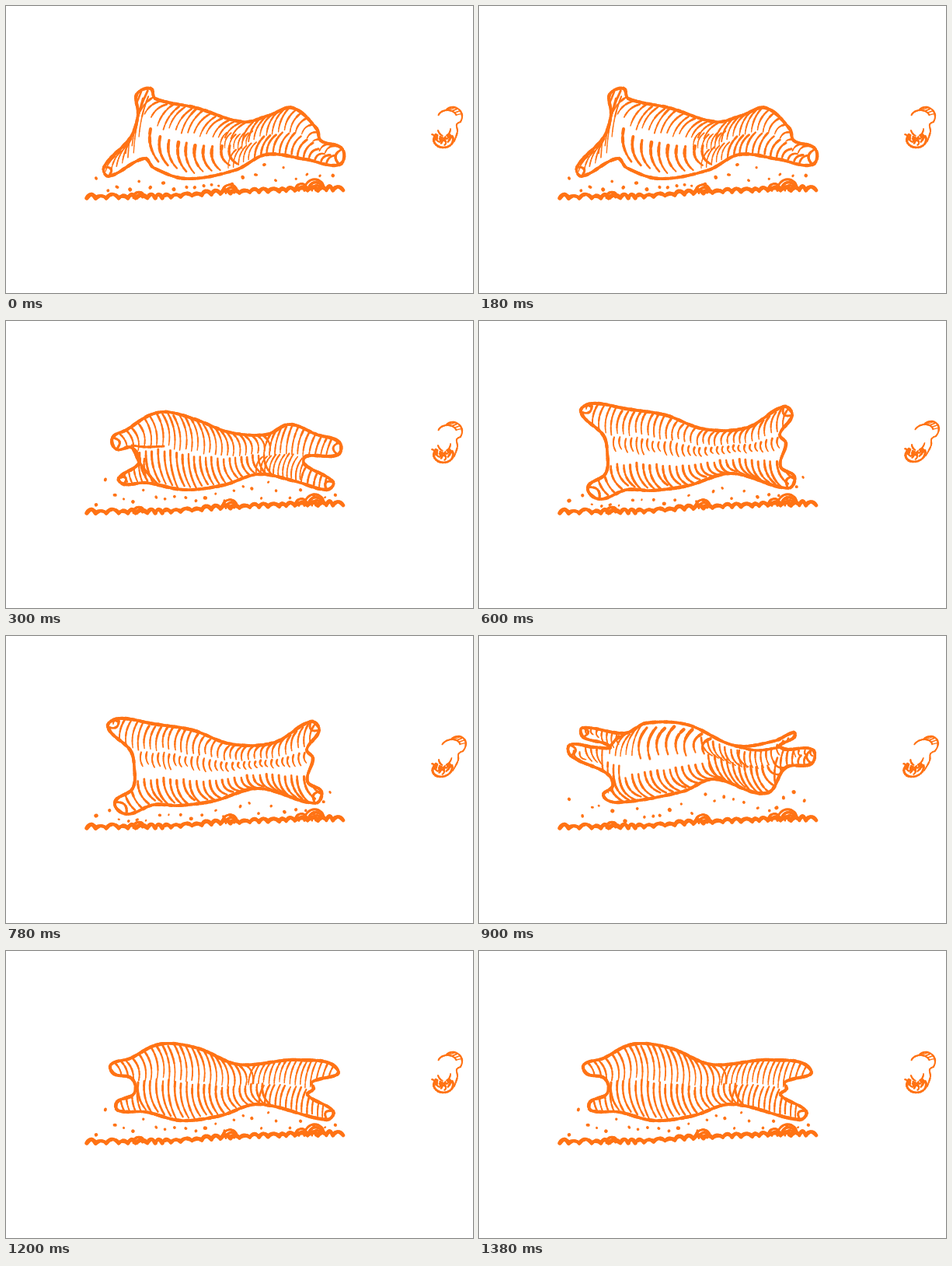
Recreate the animation shown at these times as an HTML page with a canvas. Size 601 by 369 pixels, loop 1500 ms.

```html
<!DOCTYPE html>
<html lang="en">
<head>
<meta charset="utf-8">
<title>Running hide</title>
<style>
html, body { margin: 0; width: 100%; height: 100%; overflow: hidden; background: #fff; }
canvas { display: block; width: 601px; height: 369px; }
</style>
</head>
<body>
<canvas id="stage" width="601" height="369"></canvas>
<script>
const INK = '#ff7315';
const STEP = 300;
const g = document.getElementById('stage').getContext('2d');

// body: key points, clockwise; feet: edges that end in a cut limb
// bands: from x, to x, start depth, end depth (0 top, 1 bottom), slant, bend, weight
const poses = [
  {
    body: '168,114 186,106 192,119 245,131 305,149 340,140 369,131 400,158 405,173 433,184 429,204 385,197 335,191 295,211 232,222 190,208 178,196 132,219 126,207 161,168 170,138',
    feet: [9, 17], seed: 3, lean: 0, shift: 0,
    bands: [
      [134, 184, .1, .7, -12, 2, 2.4], [174, 312, 0, .4, -20, 3, 2.8], [186, 300, .5, .93, 10, 5, 4],
      [284, 322, .25, .6, -8, 3, 2], [296, 326, .55, .95, -10, 3, 2.2],
      [318, 425, 0, .5, -14, 3, 2.7], [332, 432, .5, 1, -12, 3, 2.7]
    ]
  },
  {
    body: '137,150 155,140 185,121 208,117 245,127 287,143 335,146 365,133 400,146 429,156 427,172 386,174 384,184 421,207 413,217 372,206 325,197 280,211 230,217 180,208 152,210 145,202 171,182 162,163 142,165',
    feet: [9, 13, 20, 24], seed: 8, lean: 0, shift: 0,
    folds: ['162,160 180,162 203,161', '163,164 173,184 196,211'],
    bands: [
      [147, 335, 0, .48, 8, -4, 2.7], [172, 335, .5, 1, 10, 3, 2.7], [340, 425, 0, .55, -8, 2, 2.6],
      [330, 388, .52, 1, -8, 3, 2], [388, 424, .6, 1, -8, 2, 2.6], [152, 182, .6, 1, 4, 2, 2.4]
    ]
  },
  {
    body: '131,117 145,106 190,113 240,121 290,139 345,137 392,110 403,121 387,146 395,157 388,187 406,200 398,215 325,196 268,212 222,218 190,217 155,229 140,214 163,196 165,168 160,147',
    feet: [0, 6, 11, 17], seed: 5, lean: .2, shift: -1,
    bands: [
      [144, 398, 0, .33, -6, 3, 2.8], [174, 392, .34, .55, 2, 2, 2.6], [152, 398, .66, 1, 14, 4, 2.9]
    ]
  },
  {
    body: '117,140 148,143 168,142 134,130 133,118 188,125 215,112 268,114 330,141 380,135 405,124 406,130 388,143 429,146 428,164 395,169 370,202 302,184 262,200 178,214 160,205 172,193 165,177 118,154',
    feet: [3, 13, 23], seed: 6, lean: .23, shift: -3,
    folds: ['168,142 177,133 188,126', '330,142 358,147 388,143'],
    bands: [
      [138, 184, 0, .22, 2, 2, 2.4], [122, 184, .45, .9, 8, 3, 2.5], [180, 214, 0, .35, -12, 3, 2.5],
      [216, 302, .05, .48, -8, 6, 4], [165, 302, .62, 1, 20, 5, 2.9], [286, 338, .1, .5, 14, 4, 2.7],
      [295, 382, .42, 1, 16, 4, 2.7], [335, 428, .1, .5, 3, 2, 2.6], [384, 428, .4, 1, -3, 2, 2.6]
    ]
  },
  {
    body: '135,146 160,138 190,122 215,119 250,126 300,146 375,140 427,153 393,169 396,177 388,185 421,206 413,217 325,197 275,212 225,218 180,207 144,205 143,194 165,183 162,164 139,158',
    feet: [11], seed: 8, lean: 0, shift: 0,
    bands: [
      [140, 315, 0, .5, 8, -4, 2.7], [170, 335, .48, 1, 10, 4, 2.7], [320, 422, 0, .5, -8, 2, 2.4],
      [332, 418, .5, 1, -6, 2, 2.4], [148, 176, .58, 1, 4, 2, 2.4]
    ]
  }
];

const parse = s => s.split(' ').map(p => p.split(',').map(Number));
const mix = (a, b, t) => a + (b - a) * t;
const noise = n => { const v = Math.sin(n * 12.9898) * 43758.5453; return v - Math.floor(v); };

function random(seed) {
  let n = seed * 101;
  return (low = 0, high = 1) => mix(low, high, noise(++n));
}

// Smooth curve whose tangents scale with each segment, so corners stay tight
function smooth(pts, closed) {
  const n = pts.length, out = [];
  const at = i => closed ? pts[(i + n) % n] : pts[Math.max(0, Math.min(n - 1, i))];
  const aim = (p, q, len) => {
    const k = len / (Math.hypot(q[0] - p[0], q[1] - p[1]) || 1);
    return [(q[0] - p[0]) * k, (q[1] - p[1]) * k];
  };
  for (let i = 0; i < (closed ? n : n - 1); i++) {
    const [a, b, c, d] = [at(i - 1), at(i), at(i + 1), at(i + 2)];
    const len = Math.hypot(c[0] - b[0], c[1] - b[1]), steps = Math.ceil(len / 3);
    const u = aim(a, c, len), v = aim(b, d, len);
    for (let k = 0; k < steps; k++) {
      const t = k / steps, s = 1 - t;
      out.push([0, 1].map(j => s * s * (1 + 2 * t) * b[j] + t * t * (3 - 2 * t) * c[j] + s * t * (s * u[j] - t * v[j])));
    }
  }
  out.push(at(closed ? 0 : n - 1));
  return out;
}

function bow(a, b, bend) {
  const dx = b[0] - a[0], dy = b[1] - a[1], len = Math.hypot(dx, dy) || 1, steps = 8;
  return Array.from({ length: steps + 1 }, (_, i) => {
    const t = i / steps, h = 4 * t * (1 - t) * bend;
    return [a[0] + dx * t - dy / len * h, a[1] + dy * t + dx / len * h];
  });
}

function arc(x, y, rx, ry, from, to) {
  return Array.from({ length: 17 }, (_, i) => {
    const a = mix(from, to, i / 16) * Math.PI;
    return [x + rx * Math.cos(a), y + ry * Math.sin(a)];
  });
}

// Uneven pen line that thins towards its end
function ink(pts, width, taper = 0) {
  for (let i = 1; i < pts.length; i++) {
    const rough = 0.82 + 0.4 * noise(pts[i][0] + pts[i][1] * 3);
    g.lineWidth = width * rough * (1 - taper * i / pts.length);
    g.beginPath();
    g.moveTo(...pts[i - 1]);
    g.lineTo(...pts[i]);
    g.stroke();
  }
}

// Top and bottom of the outline at x
function span(outline, x) {
  const ys = [];
  for (let i = 1; i < outline.length; i++) {
    const [a, b] = [outline[i - 1], outline[i]];
    if ((a[0] <= x) !== (b[0] <= x)) ys.push(mix(a[1], b[1], (x - a[0]) / (b[0] - a[0])));
  }
  return ys.length ? [Math.min(...ys), Math.max(...ys)] : null;
}

function hatch(outline, [x0, x1, top, bottom, slant, bend, weight], seed) {
  const r = random(seed);
  for (let x = x0; x < x1; x += weight * r(2.5, 3.1)) {
    const start = span(outline, x), end = span(outline, x + slant) || start;
    if (!start) continue;
    const a = [x, mix(...start, top + r(0, 0.04))];
    const b = [x + slant, mix(...end, bottom - r(0, 0.06))];
    ink(bow(a, b, bend), weight, bottom < 1 ? 0.45 : 0.15);
  }
}

function groundY(x) {
  const t = Math.max(0, Math.min(1, (x - 200) / 230));
  return 247 - 10 * t * (2 - t);
}

function drawGround() {
  const r = random(2);
  for (let x = 104; x < 430;) {
    const next = Math.min(434, x + r(8, 17));
    ink(bow([x, groundY(x)], [next, groundY(next)], -r(2, 5)), 4.6);
    x = next;
  }
  for (const [x, size] of [[171, 7], [288, 10], [380, 8], [397, 13]]) {
    const y = groundY(x);
    for (let k = size; k > 2; k -= 3.5) ink(arc(x + (size - k) * 0.4, y, k, k * 1.1, -1, -0.1), 3);
  }
}

function drawDust(outline, seed) {
  const r = random(seed);
  for (let x = 116; x < 424; x += r(8, 18)) {
    const under = span(outline, x);
    const y = r(Math.max(200, under ? under[1] + 9 : 0), groundY(x) - 9);
    const size = r(1.5, 2.7);
    g.beginPath();
    g.ellipse(x, y, size, size * r(0.7, 1.1), r(0, 3), 0, Math.PI * 2);
    g.fill();
  }
}

function drawPaw(lean, shift) {
  const r = random(4);
  g.save();
  g.transform(1, 0, -lean, 1, lean * 170 + shift, -Math.sign(lean));
  ink(arc(568, 143, 12, 9, -0.9, -0.1), 2);
  ink(arc(575, 142, 12, 12, -0.75, 0.2), 2.2);
  for (let a = -0.7; a < 0; a += 0.12) {
    ink([[568 + 12 * Math.cos(a * Math.PI), 143 + 9 * Math.sin(a * Math.PI)],
         [575 + 11 * Math.cos(a * Math.PI), 142 + 11 * Math.sin(a * Math.PI)]], 1.4);
  }
  ink(smooth(parse('585,149 580,152 581,161 577,174')), 2);
  ink(bow([556, 160], [562, 167], 1), 2);
  ink(bow([572, 158], [568, 166], -1), 2);
  ink(arc(563, 172, 12.5, 10, -0.15, 1.2), 2.8);
  for (let i = 0; i < 20; i++) {
    const x = 552 + i * 1.1, y = 180 - Math.abs(x - 563) * 0.5 - r(0, 7);
    ink(bow([x, y], [x + r(-4, 4), y - r(3, 6)], r(-2, 2)), 1.9);
  }
  g.restore();
}

function draw({ body, feet, folds = [], bands, seed, lean, shift }) {
  const pts = parse(body), outline = smooth(pts, true);
  g.fillStyle = '#fff';
  g.fillRect(0, 0, 601, 369);
  g.fillStyle = g.strokeStyle = INK;
  g.lineCap = g.lineJoin = 'round';

  g.save();
  g.beginPath();
  outline.forEach(p => g.lineTo(...p));
  g.clip();
  bands.forEach((band, i) => hatch(outline, band, seed + i));
  g.restore();

  ink(outline, 3.9);
  feet.forEach(i => ink(bow(pts[i], pts[i + 1] || pts[0], 7), 2.8));
  folds.forEach(f => ink(smooth(parse(f)), 3));
  drawDust(outline, seed);
  drawGround();
  drawPaw(lean, shift);
}

let shown = -1;
function tick() {
  const i = Math.floor(performance.now() / STEP) % poses.length;
  if (i !== shown) draw(poses[shown = i]);
  requestAnimationFrame(tick);
}
tick();
</script>
</body>
</html>
```
